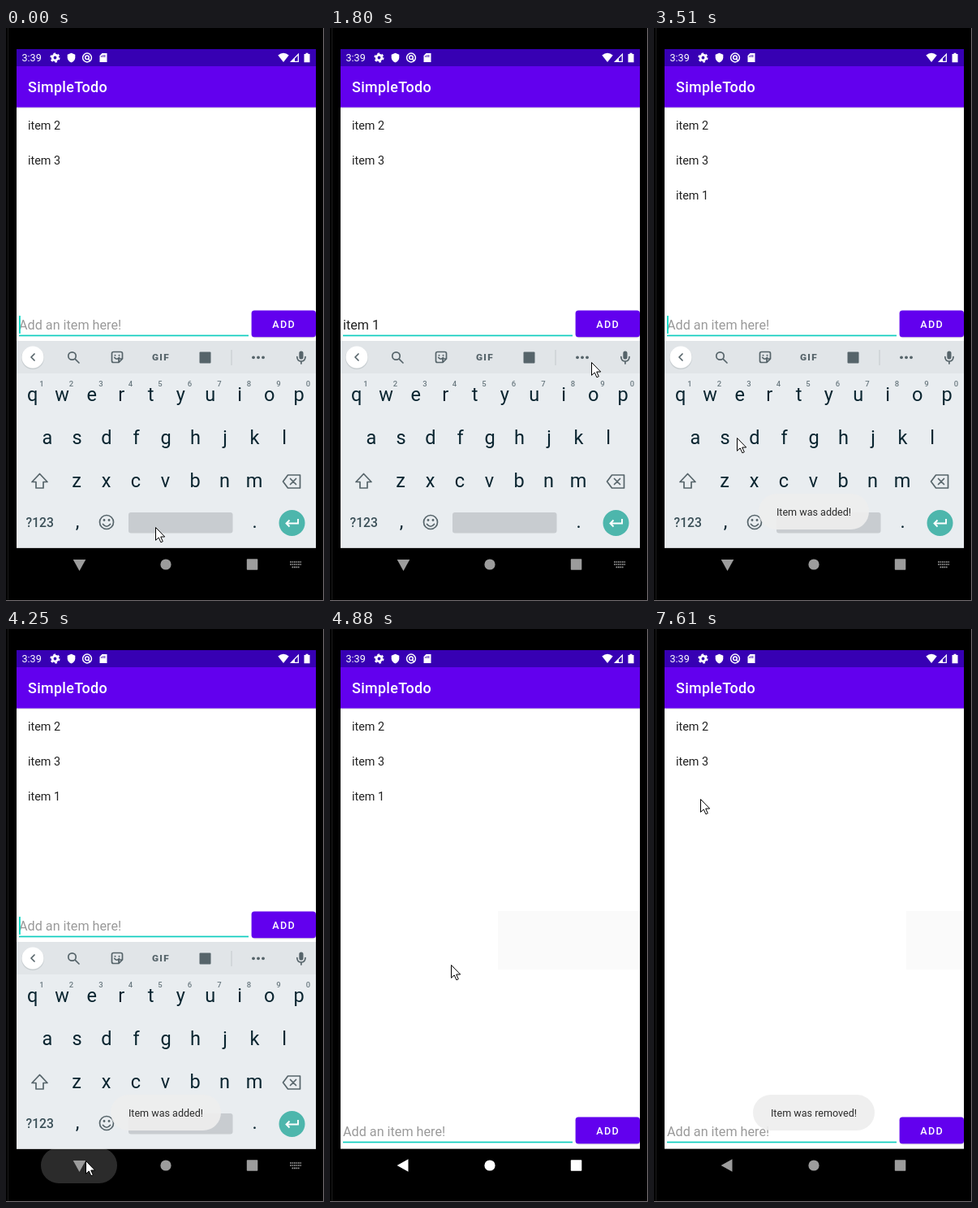
These frames come from a looping animation (392x705 px, 8 s). An HTML page:

```html
<!DOCTYPE html>
<html lang="en">
<head>
<meta charset="utf-8">
<title>Todo list demo</title>
<style>
  html, body { margin: 0; width: 100%; height: 100%; overflow: hidden; background: #000; }
  svg { display: block; width: 100%; height: 100%; font-family: Roboto, "Noto Sans", sans-serif; }
  text { white-space: pre; }
  .mid { text-anchor: middle; }
  .item { font-size: 14.4px; fill: #212121; }
  .key { font-size: 23.5px; fill: #0a2530; text-anchor: middle; }
  .num { font-size: 9.5px; font-weight: 500; fill: #6b7a81; text-anchor: middle; }
  .field { font-size: 16.2px; }
  .word { font-size: 16.2px; fill: #5f6b70; text-anchor: middle; }
  .line { fill: none; stroke: #56646a; stroke-width: 1.7; stroke-linejoin: round; stroke-linecap: round; }
  .sep { stroke: #c3c8cb; }
  .solid { fill: #56646a; }
</style>
</head>
<body>
<svg viewBox="0 0 392 705" preserveAspectRatio="none">
  <rect width="392" height="705" fill="#000"/>
  <path d="M2.5 0V705" stroke="#1c1c1c"/>
  <path d="M391.5 0V704.5H0" fill="none" stroke="#777175"/>

  <rect x="13" y="26" width="369" height="613.6" fill="#fff"/>
  <rect id="patch" y="347" height="72" fill="#fafafa"/>
  <rect x="13" y="97" width="369" height="2" fill="#e6e3ea"/>
  <rect x="13" y="26" width="369" height="21" fill="#3700b3"/>
  <rect x="13" y="47" width="369" height="50.6" fill="#6200ee"/>

  <g fill="#fff">
    <text x="19.5" y="41" font-size="12.57">3:39</text>
    <circle cx="60.5" cy="36.5" r="3.3" fill="none" stroke="#fff" stroke-width="2.8"/>
    <circle cx="60.5" cy="36.5" r="5.2" fill="none" stroke="#fff" stroke-width="1.8" stroke-dasharray="2.7 2.745"/>
    <path d="M80.5 30.7L85.3 32.7V36.4Q85 40.6 80.5 42.4Q76 40.6 75.700 36.4V32.7Z"/>
    <circle cx="100" cy="36.500" r="5.4" fill="none" stroke="#fff" stroke-width="1.5"/>
    <circle cx="100" cy="36.2" r="2.3" fill="none" stroke="#fff" stroke-width="1.5"/>
    <path d="M101.5 38L104 41" stroke="#fff" stroke-width="1.4"/>
    <path d="M118.5 31H124.5V42H115.5V34Z"/>
    <path d="M117.8 34V36M119.8 33V36M121.8 33V36" stroke="#3700b3" stroke-width=".9"/>
    <path d="M335.3 33.5Q342 28 348.7 33.5L342 42Z"/>
    <path d="M351.5 41.3H360.3V32.3Z" fill="none" stroke="#fff" stroke-width="1.3"/>
    <path d="M351 42L356 37V42Z"/>
    <path d="M367.5 32H369.5V30.7H372.5V32H374.5V42.3H367.5Z"/>
    <text x="27" y="79" font-size="17.96" font-weight="500" letter-spacing=".3">SimpleTodo</text>
  </g>

  <text class="item" x="27" y="124.5">item 2</text>
  <text class="item" x="27" y="167.5">item 3</text>
  <text class="item" x="27" y="210.5" id="third">item 1</text>

  <g id="entry">
    <text class="field" id="hint" x="16" y="371.3" fill="#9a9a9a">Add an item here!</text>
    <text class="field" id="typed" x="16" y="371.3" fill="#212121"></text>
    <rect id="compose" x="16" y="373.5" height="1" fill="#333"/>
    <rect x="16" y="377.6" width="283" height="1.7" fill="#0fcdbf"/>
    <rect id="caret" y="354" width="1.8" height="22" fill="#03dac5"/>
    <rect x="303" y="349" width="79" height="32.5" rx="4" fill="#000" opacity=".12"/>
    <rect x="302.6" y="347.6" width="79.4" height="32.7" rx="3.6" fill="#6200ee"/>
    <rect id="press" x="302.6" y="347.6" width="79.4" height="32.7" rx="3.6" fill="#fff"/>
    <text class="mid" x="342.7" y="368.7" font-size="12.57" font-weight="500" letter-spacing="1.3" fill="#fff">ADD</text>
  </g>

  <g id="board">
    <rect x="13" y="385" width="369" height="254.6" fill="#e9edf0"/>
    <rect x="13" y="385" width="369" height="40" fill="#e1e5e8"/>
    <circle cx="33" cy="406" r="14" fill="#c9cfd2"/>
    <circle cx="33" cy="405" r="13.5" fill="#fff"/>
    <path id="chevron" class="line" d="M35 401L31 405L35 409"/>

    <g id="tools">
      <circle class="line" cx="81.5" cy="403.5" r="4.7"/>
      <path class="line" d="M85.3 407.3L90 412"/>
      <path class="line" d="M132.5 398.5H141.5Q143.5 398.5 143.5 400.5V407L139 411.5H132.5Q130.5 411.5 130.5 409.5V400.5Q130.5 398.5 132.5 398.5ZM143 407H139V411M133.8 405.5Q136.5 409 139.5 405.5"/>
      <circle class="solid" cx="134.5" cy="402.7" r="1"/><circle class="solid" cx="139.5" cy="402.7" r="1"/>
      <text class="mid solid" x="191" y="409.3" font-size="11.8" font-weight="900" letter-spacing="1.3">GIF</text>
      <rect class="solid" x="238.5" y="398.5" width="14" height="14" rx="1"/>
      <path class="sep" d="M278 396V415"/>
      <circle class="solid" cx="305" cy="405.3" r="1.9"/><circle class="solid" cx="311" cy="405.3" r="1.9"/><circle class="solid" cx="317" cy="405.3" r="1.9"/>
    </g>
    <g id="words">
      <text class="word" x="93.5" y="411.3"></text>
      <text class="word" x="196" y="411.3"></text>
      <text class="word" x="298" y="411.3"></text>
      <path class="sep" d="M142.5 394V416M250.5 394V416"/>
    </g>
    <rect class="solid" x="361.3" y="397.5" width="5.2" height="10" rx="2.6"/>
    <path class="line" d="M358.8 404.5Q359 410 363.9 410Q368.8 410 369 404.5M363.9 410V413"/>

    <g id="keys"></g>
    <path class="line" d="M41.5 548.5L51 558.5H46V566H37V558.5H32Z"/>
    <path class="line" d="M347.5 550H362.5V566H347.5L341.5 558ZM350.5 554.5L357.5 561.5M357.5 554.5L350.5 561.5"/>
    <text class="mid" x="41.7" y="614" font-size="15.7" font-weight="500" fill="#3b5058">?123</text>
    <text class="key" x="88" y="615">,</text>
    <circle class="line" cx="124" cy="608" r="8.5"/>
    <circle class="solid" cx="121" cy="605.5" r="1.4"/><circle class="solid" cx="127" cy="605.5" r="1.4"/>
    <path class="line" d="M119.5 610.5Q124 616 128.5 610.5"/>
    <rect x="151" y="596" width="128.5" height="25.5" rx="3" fill="#c8ccd0"/>
    <text class="key" x="306.5" y="615">.</text>
    <circle cx="352.5" cy="609" r="16" fill="#4db6ac"/>
    <path d="M360 604V609.5H345.5M349.5 605.5L345.5 609.5L349.5 613.5" fill="none" stroke="#fff" stroke-width="1.9"/>
  </g>

  <rect id="ripple" x="43" y="638" width="94" height="44" rx="22" fill="#fff"/>
  <g id="nav">
    <path id="back" d="M82.6 660L96.5 652.2V667.8Z"/>
    <circle cx="197" cy="660" r="6.6"/>
    <rect x="296.8" y="653.3" width="13.5" height="13.5" rx=".8"/>
  </g>
  <path id="ime" d="M350 657H364M350 660H364M352.5 663.3H361.5" stroke="#999" stroke-width="1.7" stroke-dasharray="1.8 .7"/>

  <g id="toast">
    <rect y="573" height="44" rx="22" fill="#eee" fill-opacity=".92"/>
    <text class="mid" x="197" y="600" font-size="12.57" fill="#2c2c2c"></text>
  </g>
  <path id="mouse" d="M.5 .5V16.3L4.2 12.9L6.9 18.8L9.3 17.7L6.7 12H11.7Z" fill="#fff" stroke="#000"/>
</svg>
<script>
const LOOP = 8000, TICK = 129;
const ADDED = 20, CLOSED = 34, REMOVED = 53;
const BLINK = 3.5, CLEARED = 18;
const KEY_TICKS = [4, 5, 5, 6, 9, 10];

// tick, x, y of the pointer's turning points
const PATH = [
  [11, 184, 614], [12, 292, 499], [15, 337, 367], [18, 337, 367], [19, 334, 389], [22, 320, 484],
  [25, 179, 315], [26, 169, 359], [27, 102, 504], [29, 98, 654], [34, 98, 654],
  [40, 175, 292], [44, 75, 185], [46, 62, 202], [48, 57, 209]
];

const $ = id => document.getElementById(id);
const set = (el, attrs) => { for (const k in attrs) el.setAttribute(k, attrs[k]); };
const show = (el, on) => set(el, { visibility: on ? 'visible' : 'hidden' });
const ramp = (n, from, to) => Math.min(1, Math.max(0, (n - from) / (to - from)));
const pulse = (n, a, b, c, d) => ramp(n, a, b) - ramp(n, c, d);

const row = (chars, x, y, cls) => [...chars].map((c, i) =>
  `<text class="${cls}" x="${x + 36.5 * i}" y="${y}">${c}</text>`).join('');
$('keys').innerHTML = row('qwertyuiop', 32.7, 459, 'key') + row('1234567890', 44, 441, 'num') +
  row('asdfghjkl', 51, 512, 'key') + row('zxcvbnm', 87, 565, 'key');

function pointer(n) {
  const i = PATH.findIndex(p => p[0] > n);
  if (i < 0) return PATH[PATH.length - 1].slice(1);
  const b = PATH[i], a = PATH[i - 1] || b;
  const k = a === b ? 0 : ramp(n, a[0], b[0]);
  return [1, 2].map(j => a[j] + (b[j] - a[j]) * k);
}

function drawEntry(n) {
  const count = n < CLEARED ? KEY_TICKS.filter(k => k <= n).length : 0;
  const text = 'item 1'.slice(0, count);
  $('typed').textContent = text;
  const width = $('typed').getComputedTextLength();
  show($('hint'), !count);
  set($('compose'), { width: count < 5 ? width : 0 });

  // The caret stays lit after each edit, then blinks
  const edit = [-2.5, ...KEY_TICKS, CLEARED + .5].filter(k => k <= n).pop();
  set($('caret'), { x: 16 + (count > 1 ? width : count * 4) });
  show($('caret'), Math.floor((n - edit) / BLINK) % 2 === 0);

  set($('press'), { opacity: .2 * pulse(n, 17, 19, 19, 21) });
  set($('entry'), { transform: `translate(0 ${n < CLOSED ? 0 : 253})` });
  return count;
}

function drawBoard(n, count) {
  const suggest = count > 1 && n < 11;
  const list = (count < 5 ? 'item items itemize' : 'and is I').split(' ');
  $('words').querySelectorAll('text').forEach((el, i) => { el.textContent = list[i]; });
  show($('words'), suggest);
  show($('tools'), !suggest);
  set($('chevron'), { transform: `rotate(${suggest ? 180 : 0} 33 405)` });

  const slide = ramp(n, CLOSED - .65, CLOSED + .35);
  set($('board'), { transform: `translate(0 ${51 * slide})`, opacity: 1 - slide });
}

function drawNav(n) {
  const turn = ramp(n, CLOSED - .85, CLOSED + 1.15);
  const light = pulse(n, CLOSED - 1, CLOSED + .2, 54, 57);
  set($('back'), { transform: `rotate(${90 * turn - 90} 90.5 660)` });
  set($('nav'), { fill: `hsl(0 0% ${61 + 39 * light}%)` });
  set($('ripple'), { opacity: .17 * pulse(n, 29, 31, CLOSED, CLOSED + 2) });
  show($('ime'), n < CLOSED);
}

function drawToast(n) {
  const removed = n >= REMOVED - 1;
  const [pill, label] = $('toast').children;
  const half = removed ? 75 : 68;
  label.textContent = `Item was ${removed ? 'removed' : 'added'}!`;
  set(pill, { x: 197 - half, width: 2 * half });
  set($('toast'), {
    opacity: removed ? ramp(n, REMOVED - 1, REMOVED + 2) : pulse(n, ADDED - 1, ADDED + 2, 33.3, 37)
  });
}

function draw(t) {
  const n = Math.floor(t / TICK + .48);
  const [x, y] = pointer(n);
  set($('mouse'), { transform: `translate(${Math.round(x)} ${Math.round(y)})` });
  show($('third'), n >= ADDED && n < REMOVED);
  drawBoard(n, drawEntry(n));
  drawNav(n);
  drawToast(n);

  // Pale band left where the keyboard was, wiped from the left
  const left = n < CLOSED + 2 ? 13 : n < REMOVED ? 207 : 311;
  set($('patch'), { x: left, width: 382 - left });
  show($('patch'), n >= CLOSED);
}

const start = performance.now();
function tick() {
  draw((performance.now() - start) % LOOP);
  requestAnimationFrame(tick);
}
tick();
</script>
</body>
</html>
```
